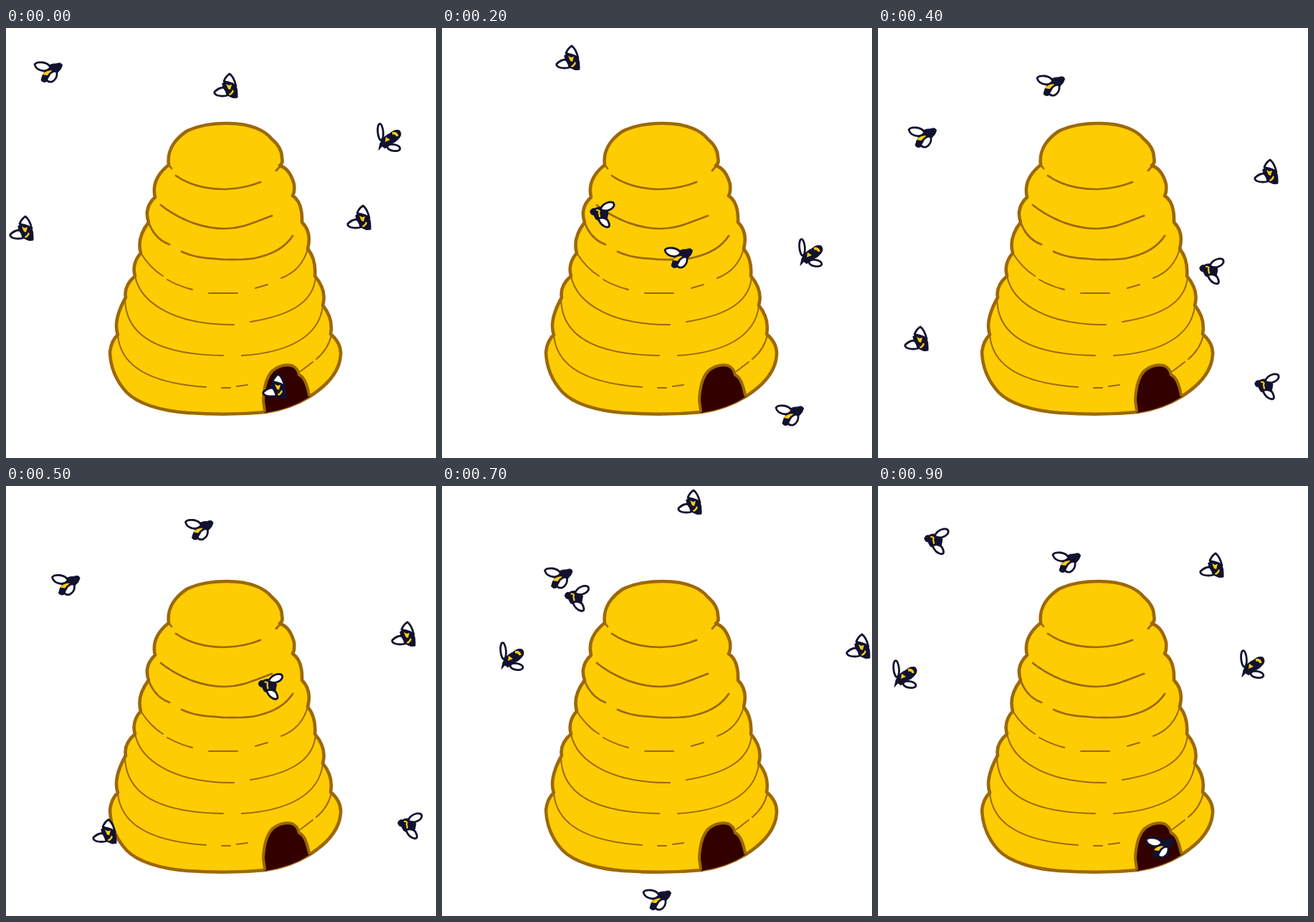
An HTML page for the animation above (1000 ms loop, 600 by 600 pixels).

```html
<!DOCTYPE html>
<html lang="en">
<head>
<meta charset="utf-8">
<title>Beehive</title>
<style>
  html, body { margin: 0; height: 100%; overflow: hidden; background: #fff; }
  svg { display: block; width: 100%; height: 100%; }
  .body { fill: #11122f; stroke: #11122f; stroke-width: 1; }
  .wing { fill: #fff; stroke: #11122f; stroke-width: 2.8; }
  .gold { fill: #fc1; }
  .line { fill: none; stroke: #fc1; stroke-width: 2.2; }
  .hive { fill: #fdcc02; stroke: #9c6808; stroke-width: 4.6; }
  .seam { fill: none; stroke: #9c6808; stroke-width: 2.7; }
  .thin { stroke-width: 2; }
</style>
</head>
<body>
<svg viewBox="0 0 600 600" stroke-linejoin="round" stroke-linecap="round">
  <defs>
    <g id="A">
      <path class="body" d="M-5-3Q-3-8 5-6L13-4Q17 6 16 16Q10 18 4 14Q-4 9-5-3Z"/>
      <path class="wing" d="M-3-7Q0-14 5-17Q11-13 14 0Q9-4 4-5Q0-5-3-7Z"/>
      <path class="wing" d="M-16 8Q-10 2-3 2Q1 7 2 13Q-5 15-12 13Q-17 11-16 8Z"/>
      <path class="gold" d="M0-3L4-1L8-2L6 5L3 4ZM4 11Q8 9 9 5L11 7Q9 12 5 13Z"/>
    </g>
    <g id="E">
      <path class="body" d="M-4-5Q3-12 11-11Q18-14 19.500-9Q18-3 14 0Q9 8 0 12Q-6 17-10 12Q-9 4-3-2Z"/>
      <path class="gold" d="M-8 4Q-4-2 5-2Q3 4-2 5Z"/>
      <path class="wing" d="M2 3Q9-3 12 1Q13 10 5 14Q-2 15-2 10Z"/>
    </g>
    <g id="B">
      <use href="#E"/>
      <path class="wing" d="M-19-10Q-17-14-8-13Q0-12 3-6Q0-2-6-1Q-17-2-19-10Z"/>
    </g>
    <g id="C">
      <ellipse class="wing" cx="-11.500" cy="-8" rx="3.800" ry="11.500" transform="rotate(-5 -11 -8)"/>
      <ellipse class="wing" cx="7" cy="14" rx="9" ry="4.500" transform="rotate(10 7 14)"/>
      <path class="body" d="M-14 17L-12 8Q-8-2 2-6Q8-12 15-10Q19-5 15 0Q10 7 1 9L-5 15L-9 12Z"/>
      <path class="line" d="M5-6Q11-7 12-2" stroke-linecap="butt" style="stroke-width:3.500"/>
      <path class="gold" d="M-4-1L2 3L-5 6Z"/>
    </g>
    <g id="D">
      <path class="body" d="M-17-4Q-16-9-11-8Q-5-12 2-8L8-3L6 8Q-2 11-9 7Q-11 4-12 1Q-17 1-17-4Z"/>
      <path class="wing" d="M-3-7Q0-15 9-17Q17-18 16-12Q14-7 6-5Q1-5-3-7Z"/>
      <path class="wing" d="M-6 6Q2 3 7 8Q12 17 7 18Q-2 17-6 6Z"/>
      <path class="line" d="M-8-6Q-3-6-5-2L-4 3"/>
    </g>
  </defs>

  <path class="hive" d="M308 133C345 133 363 145 371 155Q385 167 385 181Q387 189 382 192Q396 196 402 218Q403 229 400 234Q414 243 413 271Q427 285 421 308Q433 323 431 346Q448 366 442 387Q457 405 453 427Q468 440 467 456Q465 488 424 514Q396 531 362 536Q310 541 253 537C215 534 183 524 168 508Q146 484 145 452Q147 436 156 428Q149 408 167 376Q164 360 180 346Q175 329 188 314Q182 293 199 271Q192 251 208 236Q202 211 227 191C224 167 239 153 252 144Q274 133 308 133Z"/>
  <path class="seam" d="M227 191L231 196M377 199L384 191M237 206C258 221 282 225 305 225Q333 224 355 215M216 247C245 270 278 280 305 280C330 280 346 271 371 262M198 268Q206 294 228 302M245 312C265 321 280 321 305 323Q338 324 352 320Q386 312 400 290"/>
  <path class="seam thin" d="M188 314Q201 335 219 346M225 351Q240 360 260 365M283 370H323M348 363L365 358M384 349Q413 338 421 308M180 346C188 386 240 415 318 414M341 410C390 402 430 386 432 346M166 378C167 436 225 456 303 457M329 457C395 453 437 430 442 388M156 428C160 480 218 497 279 501M301 502L313 502M322 500L337 498M411 479L428 466M433 462Q450 448 454 428"/>
  <path fill="#300" d="M361 537L359 520Q360 490 372 478Q385 468 399 471Q407 474 409 484Q418 487 424 514Q400 531 361 537Z"/>
  <path class="seam" style="stroke-width:4" d="M361 534L359 520Q360 490 372 478Q385 468 399 471Q407 474 409 484Q418 487 423 512"/>
  <g id="bees"></g>
</svg>
<script>
// Flight paths: [step 1-10, pose, x, y]; positions are linear between keys.
const flights = [
  [[1, 'A', 144, 23], [2, 'A', 176, 42], [4, 'B', 241, 80], [6, 'B', 298, 41], [7, 'A', 346, 23],
   [8, 'A', 397, 66], [9, 'A', 466, 111], [10, 'C', 534, 153]],
  [[1, 'C', 448, 178]],
  [[7, 'C', 97, 238], [8, 'C', 65, 251], [9, 'C', 37, 263], [10, 'A', 22, 280]],
  [[1, 'C', 538, 301], [2, 'C', 514, 314], [4, 'D', 466, 339], [6, 'D', 273, 220],
   [8, 'D', 104, 93], [9, 'D', 82, 77], [10, 'B', 59, 61]],
  [[1, 'D', 306, 314], [2, 'D', 224, 260], [4, 'B', 62, 152], [6, 'B', 105, 123],
   [8, 'B', 220, 133], [9, 'B', 263, 106], [10, 'A', 307, 81]],
  [[1, 'B', 225, 380], [2, 'B', 330, 320], [4, 'A', 542, 201], [6, 'A', 568, 213],
   [7, 'A', 581, 224], [8, 'C', 550, 234], [9, 'C', 522, 249], [10, 'A', 493, 265]],
  [[1, 'A', 427, 534], [2, 'B', 485, 540], [4, 'D', 543, 500], [5, 'D', 564, 474]],
  [[4, 'A', 54, 434], [6, 'A', 222, 531], [7, 'B', 300, 577], [8, 'E', 348, 544],
   [9, 'B', 393, 504], [10, 'A', 375, 500]],
];
const layer = document.getElementById('bees');

function bee(keys, step) {
  const i = keys.findLastIndex(k => k[0] <= step);
  const a = keys[i], b = keys[i + 1] || a;
  if (!a || step > b[0]) return '';
  const u = (step - a[0]) / (b[0] - a[0] || 1);
  const mix = n => a[n] + (b[n] - a[n]) * u;
  return `<use href="#${a[1]}" x="${mix(2)}" y="${mix(3)}"/>`;
}

let shown;
function draw(now) {
  const step = Math.floor(now / 100) % 10 || 10;
  if (step !== shown) layer.innerHTML = flights.map(keys => bee(keys, step)).join('');
  shown = step;
}

const start = performance.now();
function tick() {
  draw(Math.max(0, performance.now() - start));
  requestAnimationFrame(tick);
}
tick();
</script>
</body>
</html>
```
